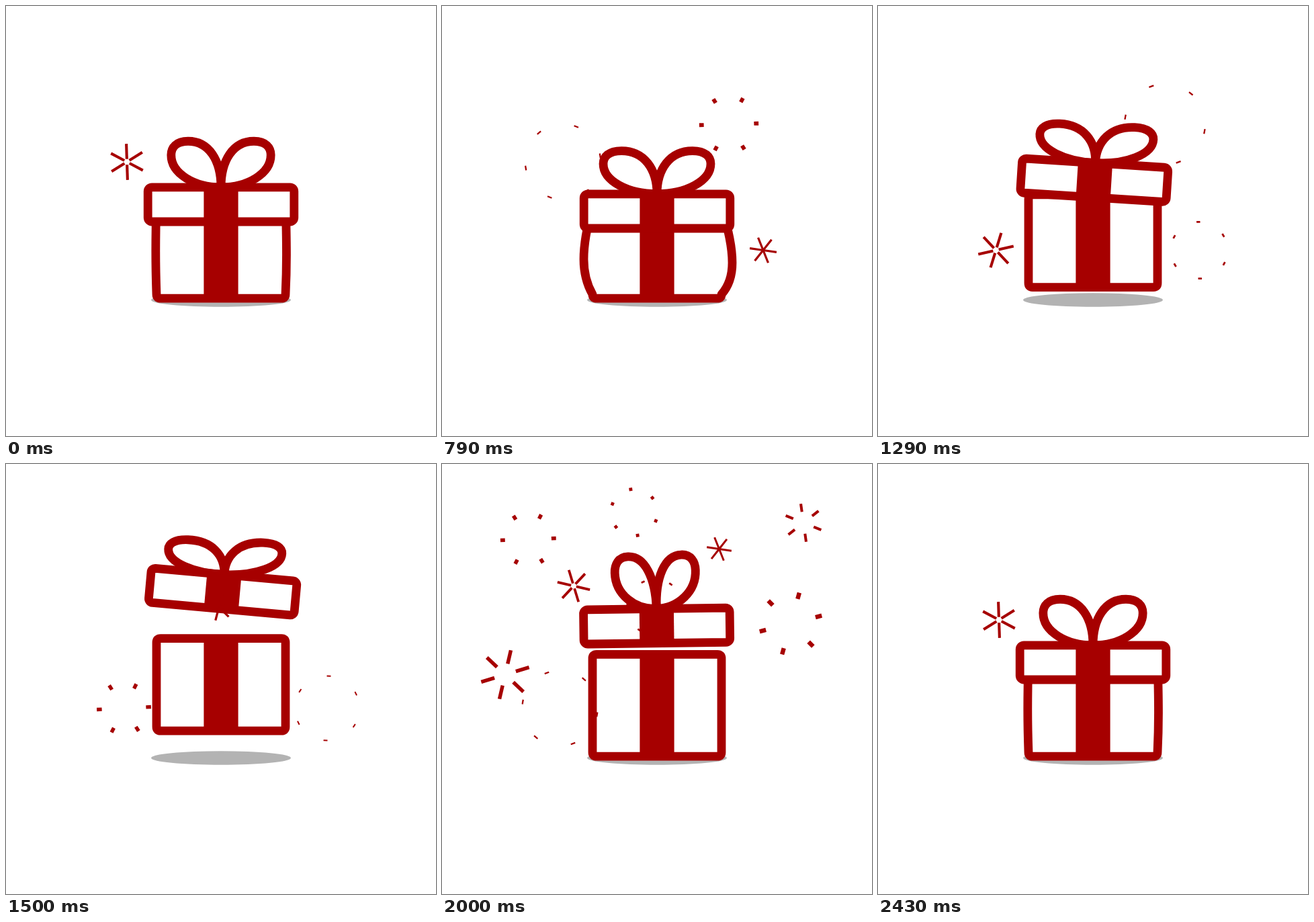
Recreate the animation shown at these times as an HTML page with a canvas. Size 640x640 px, loop 3.5 s.

```html
<!DOCTYPE html>
<html>
<head>
<meta charset="utf-8">
<style>
html, body { margin: 0; height: 100%; overflow: hidden; background: #fff; }
canvas { display: block; }
</style>
</head>
<body>
<canvas id="stage" width="640" height="640"></canvas>
<script>
const g = document.getElementById('stage').getContext('2d');
const RED = '#a60000', U = 12.8, LOOP = 3500, FPS = 14, LAST = 34;
const JUMP = 17, LAND = 29.6;
const rad = deg => deg * Math.PI / 180;

// One firework: six rays that fly out, turn, shorten and thicken
function burst(step, x, y, start, angle, size = 1) {
  const life = (step - start + .5) / 12.5;
  if (life <= 0 || life >= 1) return;
  const ease = life ** .37, reach = 59 * ease;
  const len = Math.min(reach, 2 + 40 * Math.exp(-5.5 * life));
  const thick = 7 * life ** .25;
  g.save();
  g.translate(x, y);
  g.scale(size, size);
  g.rotate(rad(angle + 44 * ease));
  g.fillStyle = RED;
  for (let i = 0; i < 6; i++) {
    g.fillRect(reach - len, -thick / 2, len, thick);
    g.rotate(Math.PI / 3);
  }
  g.restore();
}

function drawBursts(step) {
  burst(step, 180, 232, 0, 8);
  burst(step, 427, 176, 6.5, 27, 1.05);
  burst(step, 478, 363.5, 10.5, 51, .87);
  burst(step, 175.5, 363.5, 17, 27);
  burst(step, 317, 213, 20.4, 27, .85);
  burst(step, 286, 72, 23, 49, .85);
  burst(step, 128.3, 112, 23.7, 27);
  burst(step, 519, 237.5, 24.2, 16, 1.2);
  burst(step, 538, 87.5, 25.8, 57, .85);
  burst(step, 94, 313.5, 26.3, 20, 1.2);
  burst(step, 196, 181.5, 27, 53, .92);
  burst(step, 412.5, 126.5, 27.5, 51, .8);
}

function paint() {
  g.fillStyle = '#fff';
  g.fill();
  g.stroke();
}

function ribbon(top, height) {
  g.fillStyle = RED;
  g.fillRect(-2 * U, top, 4 * U, height);
}

// Half of the box; side is -1 or 1, and it bulges out most at height mid
function halfBox(side, top, bottom, out, mid) {
  const edge = 7.5 * U * side, wide = edge + side * out, r = 6;
  g.beginPath();
  g.moveTo(0, bottom);
  g.lineTo(edge - r * side, bottom);
  g.quadraticCurveTo(edge, bottom, edge, bottom - r);
  g.quadraticCurveTo(wide, mid + 29, wide, mid);
  g.quadraticCurveTo(wide, mid - 32, edge, top + r);
  g.quadraticCurveTo(edge, top, edge - r * side, top);
  g.lineTo(0, top);
  paint();
}

function drawBox(step, press) {
  const hop = Math.max(0, 1 - ((step - 21) / 4) ** 2);
  const bulge = step > JUMP ? 0 : Math.min(1, step / 11);
  const top = 283.3 + .95 * press, bottom = 34 * U;
  g.save();
  g.translate(320, -38 * hop);
  halfBox(-1, top, bottom, 13 * bulge, 364 + 13 * bulge);
  halfBox(1, top, bottom, 16 * bulge, 369 + 13 * bulge);
  ribbon(top, bottom - top);
  g.restore();
}

function bowLoop(w, h) {
  g.beginPath();
  g.moveTo(0, 0);
  g.bezierCurveTo(0, -.58 * h, .24 * w, -h, .66 * w, -h);
  g.bezierCurveTo(.9 * w, -h, w, -.86 * h, w, -.7 * h);
  g.bezierCurveTo(w, -.3 * h, .54 * w, 0, 0, 0);
  g.stroke();
}

function drawLid(step, press) {
  const air = step > JUMP && step < LAND;
  const f = air ? (step - JUMP) / (LAND - JUMP) : 0;
  const sway = Math.sin(2 * Math.PI * f);
  const turn = 8.3 * sway * (1 - f);
  const rise = air ? 3.03 * (step - JUMP) * (LAND - step) : -press;
  const flat = .43 * press + 14 * sway;
  const w = 73.6 + Math.min(11, 1.35 * flat), h = 69 - flat;
  g.save();
  g.translate(320 + turn / 2, 23 * U - rise);
  g.rotate(rad(turn));

  g.save();
  g.translate(0, -2 * U);
  g.rotate(rad(-3.5 * Math.sin(Math.PI * f)));
  bowLoop(-w, h);
  bowLoop(w, h);
  g.restore();

  g.beginPath();
  g.roundRect(-8.5 * U, -2 * U, 17 * U, 4 * U, 6);
  paint();
  ribbon(-2 * U, 4 * U);
  g.restore();
}

function draw(step) {
  g.fillStyle = '#fff';
  g.fillRect(0, 0, 640, 640);
  g.fillStyle = '#b3b3b3';
  g.beginPath();
  g.ellipse(320, 437.5, 104, 10.3, 0, 0, 7);
  g.fill();
  g.strokeStyle = RED;
  g.lineWidth = U;
  g.lineJoin = 'round';
  // Pressed down slowly, springs back after the jump
  const press = Math.max(0, Math.min(step, 15, 15 * (25 - step) / 4));
  drawBox(step, press);
  drawLid(step, press);
  drawBursts(step);
}

// Steps fall on hundredths of a second; the last one rests on the opening pose
function stepAt(t) {
  let k = 0;
  while (k < LAST && Math.round((k + 1) * 100 / FPS) * 10 <= t) k++;
  return k === LAST ? 1 : Math.max(1, k);
}

let start;
function tick(now) {
  start ??= now;
  draw(stepAt((now - start) % LOOP));
  requestAnimationFrame(tick);
}
draw(1);
requestAnimationFrame(tick);
</script>
</body>
</html>
```
